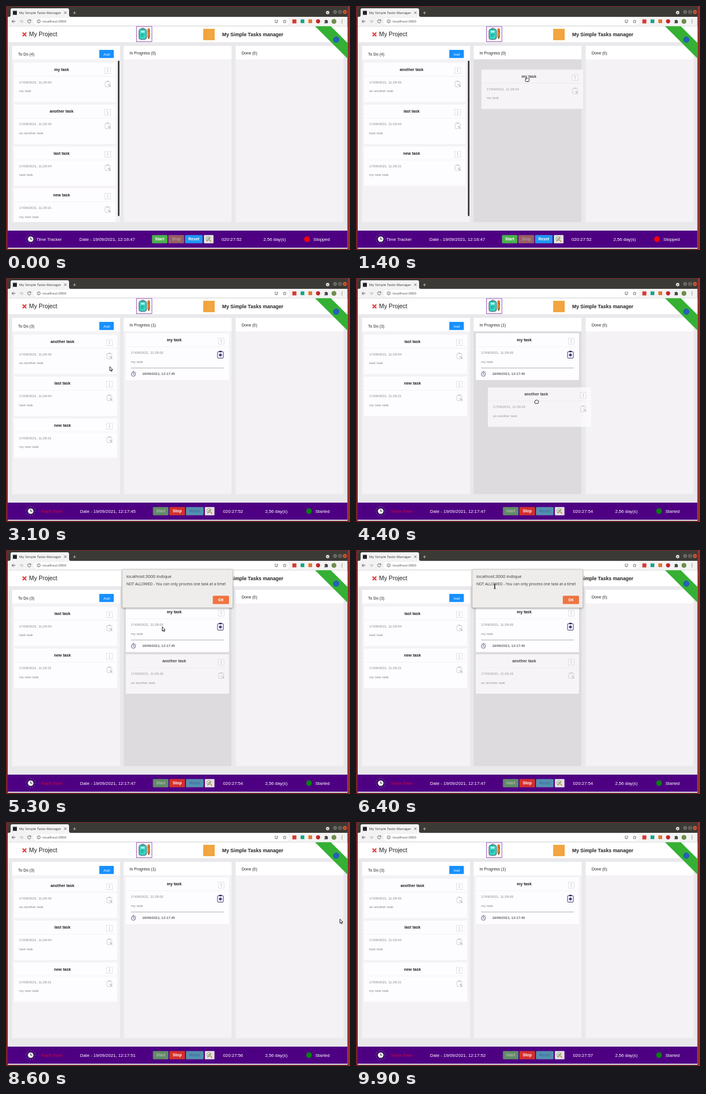
Recreate the animation shown at these times as an HTML page. Size 600x428 px, loop 10000 ms.

```html
<!DOCTYPE html>
<html lang="en">
<head>
<meta charset="utf-8">
<title>My Simple Tasks Manager</title>
<style>
  html, body { margin: 0; width: 100%; height: 100%; overflow: hidden; background: #e9e8eb; }
  svg { display: block; width: 100vw; height: 100vh; }
  text { font-family: "Liberation Sans", Arial, sans-serif; white-space: pre; }
  .ui { font-family: "Open Sans", "Noto Sans", sans-serif; }
  .b { font-weight: bold; }
</style>
</head>
<body>
<svg id="stage" viewBox="0 0 600 428" xmlns="http://www.w3.org/2000/svg">
  <defs>
    <clipPath id="lists"><rect x="11" y="93" width="578" height="286"/></clipPath>
    <clipPath id="page"><rect x="3" y="35" width="592.5" height="390"/></clipPath>
    <filter id="shadow" x="-10%" y="-20%" width="120%" height="150%">
      <feDropShadow dx="0" dy="1" stdDeviation="1.8" flood-opacity=".4"/>
    </filter>
  </defs>
  <g id="backdrop"></g>
  <g id="live"></g>
  <g id="ribbon"></g>
</svg>
<script>
const LOOP = 10000, STEP = 100;
const START = 2300, ALERT_OPEN = 5100, ALERT_NUDGE = 7700, ALERT_CLOSE = 8100;
const TOP = 99.5, PITCH = 73.4;
const FIRST_DRAG = [600, 1800], SECOND_DRAG = [3400, 4700];

const tasks = {
  my: ['my task', '17/09/2021, 11:28:03', 'my task'],
  another: ['another task', '17/09/2021, 11:28:43', 'an another task'],
  last: ['last task', '17/09/2021, 11:29:04', 'task task'],
  fresh: ['new task', '17/09/2021, 11:28:21', 'my new task']
};

// Each entry: time, x, y
const firstCard = [[600, 14, TOP], [1500, 226, 112], [1800, 226, 112], [2200, 209, 97]];
const secondCard = [[3400, 14, TOP], [4100, 228, 186], [4400, 230, 192], [4700, 230, 192], [5000, 209, 183]];
const pointer = [
  [0, 100, 440], [500, 94, 117], [600, 94, 117], [1500, 306, 130], [1800, 306, 130],
  [2200, 201, 173.5], [2600, 190, 162], [3100, 181, 155.5], [3400, 99, 124.5], [4100, 313, 211],
  [4400, 315, 217], [4700, 315, 217], [5400, 270, 130], [6300, 242, 64], [6600, 242, 64],
  [7500, 380, 86], [8200, 380, 86], [8700, 606, 180]
];

const ease = p => { p = Math.min(1, Math.max(0, p)); return p * p * (3 - 2 * p); };

function along(path, t) {
  let i = 0;
  while (i < path.length - 2 && t >= path[i + 1][0]) i++;
  const [t0, x0, y0] = path[i], [t1, x1, y1] = path[i + 1];
  const p = ease((t - t0) / (t1 - t0));
  return [x0 + (x1 - x0) * p, y0 + (y1 - y0) * p];
}

const rect = (x, y, w, h, fill, extra = '') =>
  `<rect x="${x}" y="${y}" width="${w}" height="${h}" fill="${fill}" ${extra}/>`;
const circle = (x, y, r, fill, extra = '') =>
  `<circle cx="${x}" cy="${y}" r="${r}" fill="${fill}" ${extra}/>`;
const line = (d, stroke, width = 1, extra = '') =>
  `<path d="${d}" fill="none" stroke="${stroke}" stroke-width="${width}" ${extra}/>`;
const shape = (d, fill, extra = '') => `<path d="${d}" fill="${fill}" ${extra}/>`;
// y is the middle of the capitals
const text = (x, y, str, size, fill, extra = '') =>
  `<text x="${x}" y="${y + size * .36}" font-size="${size}" fill="${fill}" ${extra}>${str}</text>`;
const at = (x, y, body, extra = '') => `<g transform="translate(${x} ${y})" ${extra}>${body}</g>`;

function browser() {
  const ink = '#55585c';
  return rect(0, 0, 600, 428, '#7c2224') + rect(596, 0, 4, 428, '#98302a') + rect(2, 1, 594, 425.5, '#3c3a36')
    + shape('M5 19Q8 19 8 16V7Q8 4 11 4H107Q110 4 110 7V16Q110 19 113 19Z', '#f3f3f3')
    + rect(12, 8.5, 7, 7, '#20232a')
    + text(23, 12, 'My Simple Tasks Manager', 6.1, '#333', 'class="ui"')
    + line('M101.5 9.8l4 4m0-4l-4 4', '#555', .9)
    + line('M117 12h5m-2.5-2.5v5', '#ccc', .8)
    + circle(561, 11.5, 3, '#dedede') + line('M559.8 11l1.2 1.2 1.2-1.2', '#333', .7)
    + circle(574, 10.5, 3.2, '#75726b') + circle(582.5, 10.5, 3.2, '#75726b') + circle(591, 10.5, 3.4, '#d9572f')
    + line('M572.5 10.5h3M581.2 9.2h2.6v2.6h-2.6zM589.8 9.3l2.4 2.4m0-2.4l-2.4 2.4', '#2e2c29', .7)
    + rect(3, 19, 592.5, 16.5, '#f3f3f3') + rect(48, 21, 446, 12, '#fff', 'rx="6"')
    + line('M16.5 27h-6m2.7-2.8l-2.8 2.8 2.8 2.8', ink)
    + line('M23.5 27h6m-2.7-2.8l2.8 2.8-2.8 2.8', '#b0b2b5')
    + line('M42.6 25a2.8 2.8 0 1 0 .6 2.6M43.2 23.8v2h-2', ink)
    + circle(57, 27, 2.8, 'none', `stroke="${ink}" stroke-width=".8"`)
    + line('M57 26.7v1.7M57 25.2v.8', ink, .8)
    + text(64, 27, 'localhost:3000', 6.1, '#444', 'class="ui"')
    + line('M472 24.8h-2.6v3.6h4.6v-1.2M470.5 29.4h2.4M473.6 24v2.4m-1-1l1 1 1-1', ink, .7)
    + line('M486 24l.9 2 2.1.2-1.6 1.5.5 2.1-1.9-1.1-1.9 1.1.5-2.1-1.6-1.5 2.1-.2z', ink, .7)
    + rect(499.5, 23.5, 7, 7, '#d83a32') + rect(513.8, 23.5, 6.5, 6.5, '#15a589')
    + rect(527.5, 23.5, 6.5, 6.5, '#e2762f') + circle(544.3, 26.8, 3.6, '#c8232c')
    + shape('M555.5 25h1.8a1.1 1.1 0 0 1 2.2 0h1.6v2a1.1 1.1 0 0 1 0 2v1.2h-5.6v-1.6a1 1 0 0 0 0-2z', '#45484c')
    + circle(572, 27, 4.3, '#6c8f4c')
    + [24.5, 27, 29.5].map(y => circle(586, y, .7, ink)).join('');
}

function header() {
  const logo = rect(344, 40, 20, 20, '#f2a540');
  const backpack = rect(227.5, 36, 27, 26.5, '#fff', 'stroke="#9a4cbc" stroke-width=".9"')
    + line('M236 41v-1.2q0-1 2.5-1t2.5 1V41', '#2c4a52', 1)
    + rect(232, 40.5, 13, 18, '#35d6c2', 'rx="3.2" stroke="#2c4a52" stroke-width=".9"')
    + rect(235.2, 43.6, 6.6, 3, '#c4f4ee', 'rx="1"')
    + line('M234.5 50h7M234.5 53h5', '#1c5f62', .8)
    + shape('M247.3 41.5q0-2 1.6-2t1.6 2v12.5l-1.6 4-1.6-4z', '#ef8a3c', 'stroke="#5b3524" stroke-width=".7"')
    + line('M247.3 44h3.2M247.3 54h3.2', '#5b3524', .6);
  return rect(3, 35.5, 592.5, 390, '#e9e8eb') + rect(3, 35.5, 592.5, 28, '#fff')
    + line('M29 46.6l6.4 6.4m0-6.4l-6.4 6.4', '#e23b3b', 2.1)
    + text(40.3, 49.5, 'My Project', 10.4, '#222') + backpack + logo
    + text(377, 49.5, 'My Simple Tasks manager', 8.58, '#222', 'class="b"');
}

const ribbon = () => `<g clip-path="url(#page)">${shape('M539 35.5h27.5l30 30V93z', '#35b034')}</g>`
  + circle(576, 59, 5.5, '#2463b0');

const gear = (x, y, r, color) => circle(x, y, r, 'none', `stroke="${color}" stroke-width="1.1"`)
  + line([0, 45, 90, 135].map(a => {
      const c = Math.cos(a * Math.PI / 180) * r * 1.7, s = Math.sin(a * Math.PI / 180) * r * 1.7;
      return `M${x - c} ${y - s}L${x + c} ${y + s}`;
    }).join(''), color, .6);

const clipboard = active => active
  ? rect(-5, -5, 10, 11.2, '#fff', 'rx="1" stroke="#25215f" stroke-width=".9"')
    + rect(-2.2, -6.6, 4.4, 2.6, '#25215f', 'rx=".7"') + gear(0, .8, 1.8, '#2a2680')
  : rect(-4.5, -4.5, 8.5, 9.5, 'none', 'rx="1" stroke="#c4c3c7" stroke-width=".8"')
    + rect(-2.2, -5.6, 4, 2, '#c4c3c7', 'rx=".7"')
    + line('M.5 .5l4.3 4.3', '#b4b3b8', 1.4);

function card(task, x, y, { w = 180, held = false, started = '' } = {}) {
  const [name, date, note] = task, h = started ? 82 : 69;
  const menu = rect(w - 18.7, 8.7, 10, 10.3, '#fff', 'stroke="#d9d8db" stroke-width=".8"')
    + [11.6, 13.8, 16].map(v => circle(w - 13.7, v, .55, '#666')).join('');
  const timing = started && line(`M9 60.9H${w - 9}`, '#96949c', .8)
    + circle(13.2, 71.8, 3.6, '#fff', 'stroke="#34306c" stroke-width=".8"')
    + line('M13.2 69.6v2.2l1.6.8M12 66.8h2.4M16.2 68.2l.8-.8', '#34306c', .8)
    + text(28.5, 71, started, 6.05, '#222');
  return at(x, y, rect(0, 0, w, h, '#fdfcfe')
    + line(`M0 23.7H${w}`, '#efeef1', .8)
    + text(w / 2 - 5.6, 11.8, name, 6.95, '#1d1d1f', 'class="b" text-anchor="middle"')
    + menu + text(9, 34.3, date, 6.03, '#86858a') + text(9, 49.7, note, 6.1, '#86858a')
    + at(w - (started ? 15 : 13.5), 37.3, clipboard(!!started)) + timing,
    held ? 'opacity=".78"' : '');
}

function column(x, title, y, hovered) {
  return rect(x, 70, 188, 309, hovered ? '#dddbde' : '#f4f2f5')
    + rect(x, 70, 188, 23.5, '#fff') + text(x + 10.3, y, title, 6.93, '#222');
}

function board(t) {
  const started = t >= START;
  const first = t >= FIRST_DRAG[0] && !started;
  const second = t >= SECOND_DRAG[0] && t < ALERT_CLOSE;
  const held = first ? along(firstCard, t) : second ? along(secondCard, t) : null;
  const inProgress = held && held[0] > 110;
  const w = started ? 180 : 177;
  const lift = first ? ease((t - 950) / 250) : second ? ease((t - 3650) / 250) : 0;

  const names = started ? ['another', 'last', 'fresh'] : ['my', 'another', 'last', 'fresh'];
  let cards = names.map((n, i) => i === 0 && held ? ''
    : card(tasks[n], 14, TOP + (i - (i ? lift : 0)) * PITCH, { w })).join('');
  if (started) cards += card(tasks.my, 209, 97, { started: '19/09/2021, 12:17:45' });

  return column(10.7, `To Do (${started ? 3 : 4})`, 84.3, held && !inProgress)
    + column(205.3, `In Progress (${started ? 1 : 0})`, 82.5, inProgress)
    + column(400.7, 'Done (0)', 82.5, false)
    + rect(162.7, 77, 25.3, 14.3, '#1890ff', 'rx="1"') + text(170, 84.3, 'Add', 6.2, '#fff')
    + `<g clip-path="url(#lists)">${cards}</g>`
    + (started ? '' : rect(195.2, 96, 2.6, 272.5, '#2d2c30', 'rx="1"'))
    + (held ? card(tasks[names[0]], ...held, { w, held: true }) : '');
}

function clockValues(t) {
  if (t < START) return ['12:16:47', 52];
  const live = Math.floor((t - START) / 1000);
  const blocked = t >= ALERT_OPEN && t < ALERT_CLOSE;
  const date = 45 + (blocked ? 2 : live);
  return [`12:17:${date}`, t < ALERT_CLOSE ? date + 7 : date + 5];
}

function footer(t) {
  const on = t >= START, dx = on ? 1.7 : 0, [date, count] = clockValues(t);
  const button = (x, w, label, fill, ink) => rect(x + dx, 401.7, w, 14.6, fill, 'rx="1.5"')
    + text(x + dx + w / 2, 408.8, label, 7, ink, 'class="b" text-anchor="middle"');
  const tools = rect(345.2 + dx, 401.7, 16.7, 14.6, '#e4e2e0', 'rx="1"')
    + at(353.4 + dx, 409, circle(-1.2, -1, 3.2, '#fff', 'stroke="#4b7a52" stroke-width=".8"')
      + line('M1.5 1.5l3 3M-4 4l7-8', '#b56d30', 1.1) + circle(-1.2, -1, 1, '#4b7a52'));
  const clock = circle(43, 409, 8, 'none', 'stroke="#b9aebb" stroke-width="1" stroke-dasharray="1 3.19"')
    + circle(43, 409, 5.5, '#f7f5fa', 'stroke="#201a42" stroke-width="1.3"')
    + line('M43 405.7v3.5h2.6', '#201a42', 1);
  return rect(3, 394, 592.5, 30, '#4e0083') + rect(3, 424, 592.5, 1.6, '#f1eff3') + clock
    + (on ? text(60.7, 408.8, 'Track Time', 7.65, '#e8002c') : text(53, 408.8, 'Time Tracker', 7.65, '#fff'))
    + text(on ? 129 : 128, 408.8, `Date - 19/09/2021, ${date}`, 7.8, '#fff')
    + button(254.6, 27, 'Start', on ? '#628a69' : '#4caf50', on ? '#a9b9a9' : '#fff')
    + button(283.3, 27.3, 'Stop', on ? '#d3302f' : '#966064', on ? '#fff' : '#b99a9c')
    + button(312.3, 30.6, 'Reset', on ? '#558eae' : '#2196f3', on ? '#3c72a6' : '#fff')
    + tools
    + text(on ? 378.5 : 376, 408.8, `020:27:${count}`, 7.85, '#fff')
    + text(on ? 452 : 449, 408.8, '2,56 day(s)', 7.8, '#fff')
    + circle(on ? 528.5 : 525, 409, 4.9, on ? '#0a8010' : '#fb0007')
    + text(on ? 539.7 : 536, 408.8, on ? 'Started' : 'Stopped', 7.75, '#fff');
}

function alertBox(t) {
  if (t < ALERT_OPEN || t >= ALERT_CLOSE) return '';
  return at(202.7, t < ALERT_NUDGE ? 34 : 33, rect(0, 0, 193, 67.3, '#efedeb', 'rx="2" stroke="#b5b2ae" stroke-width=".6" filter="url(#shadow)"')
    + text(7.2, 12, 'localhost:3000 indique', 7.5, '#333', 'class="ui"')
    + text(7.2, 25.7, 'NOT ALLOWED - You can only process one task at a time!', 6.6, '#333', 'class="ui"')
    + rect(158, 46.3, 28.3, 14.4, '#ef7440', 'rx="1.5"')
    + text(172.2, 53.6, 'OK', 6.6, '#fff', 'class="ui b" text-anchor="middle"'));
}

function cursor(t) {
  const [x, y] = along(pointer, t);
  const within = ([from, to]) => t >= from && t < to;
  const outline = 'stroke="#111" stroke-width=".9" stroke-linejoin="round"';
  if (within(FIRST_DRAG) || within(SECOND_DRAG))
    return at(x, y, shape('M-2.5 3q-1.7-2-1-3.2.4-.8 1.3-.4-.2-2.3 1.2-1.9.8-1 1.6-.1.9-.6 1.5.4 1.4-.2 1.3 1.6 0 2-1 3.6z', '#fff', outline));
  if (t >= 6200 && t < 6700)
    return at(x, y, line('M-1.7 -4q1.7 0 1.7 1v6q0 1 1.7 1M1.7 -4q-1.7 0-1.7 1v6q0 1-1.7 1', '#111', .9));
  return at(x, y, shape('M0 0v7.4l1.7-1.5 1.2 2.6 1.2-.6-1.2-2.5h2.3z', '#fff', outline));
}

const live = document.getElementById('live');
document.getElementById('backdrop').innerHTML = browser() + header();
document.getElementById('ribbon').innerHTML = ribbon();

let shown = -1;
function tick() {
  const t = Math.floor(performance.now() % LOOP / STEP) * STEP;
  if (t !== shown) {
    live.innerHTML = board(t) + footer(t) + alertBox(t) + cursor(t);
    shown = t;
  }
  requestAnimationFrame(tick);
}
tick();
</script>
</body>
</html>
```
